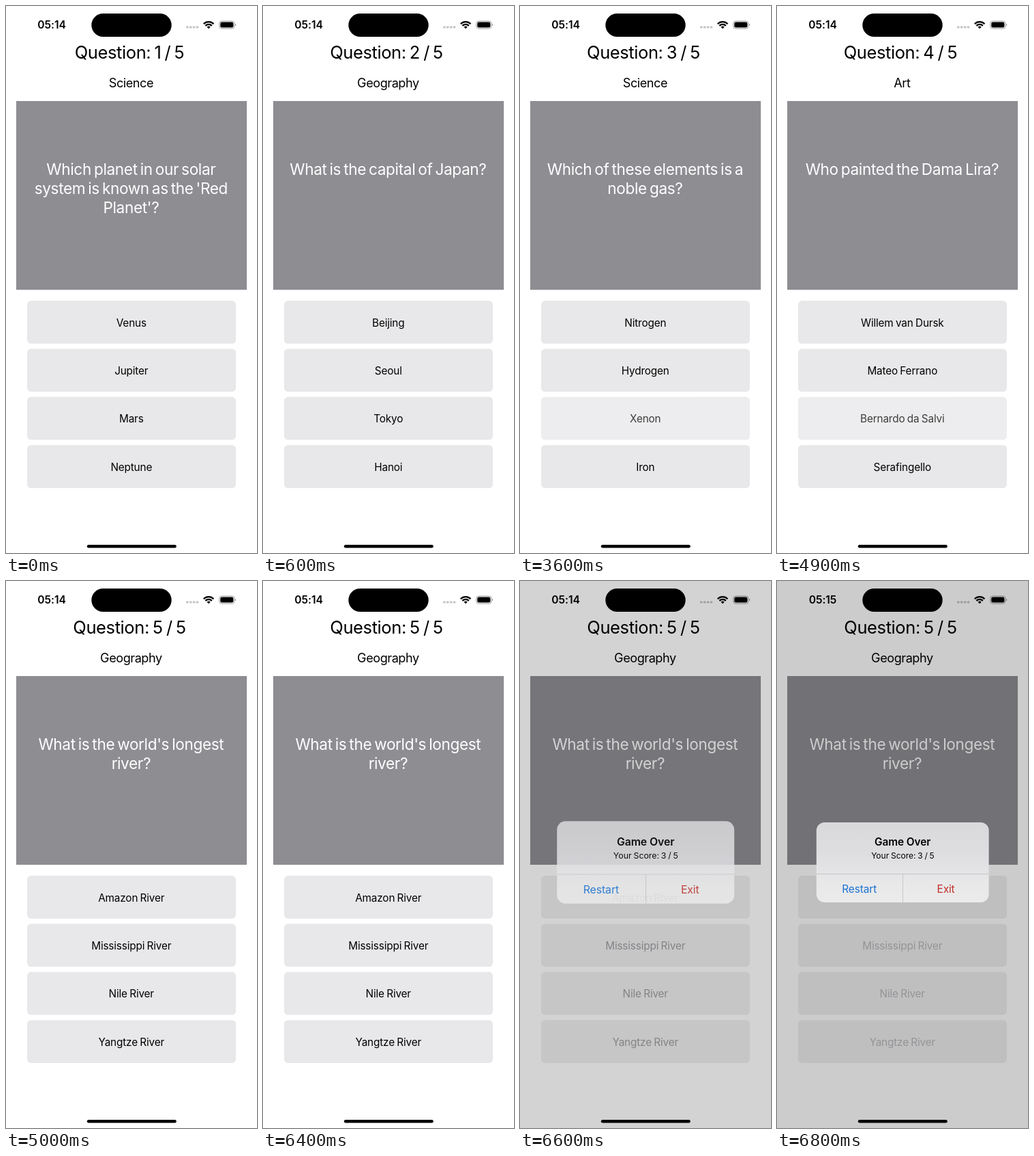
These frames come from a looping animation (368 px wide and 800 px high, 8000 ms). An HTML page:

```html
<!DOCTYPE html>
<html lang="en">
<head>
<meta charset="utf-8">
<title>Quiz</title>
<style>
html, body { margin: 0; width: 100%; height: 100%; overflow: hidden; background: #fff; }
svg { display: block; width: 100vw; height: 100vh; }
text { font-family: Inter, "Noto Sans", sans-serif; text-anchor: middle; white-space: pre; }
.head { font-size: 25.5px; letter-spacing: -.4px; word-spacing: -1.6px; }
.topic { font-size: 18.1px; letter-spacing: -.45px; }
.ask { font-size: 22.6px; letter-spacing: -.36px; word-spacing: -2px; fill: #fff; }
.pick { font-size: 15.3px; letter-spacing: -.15px; word-spacing: -.8px; }
.clock { font-size: 15.6px; font-weight: 600; letter-spacing: -.05px; }
.title { font-size: 15.4px; font-weight: 600; letter-spacing: -.08px; }
.score { font-size: 12px; word-spacing: -.6px; }
.act { font-size: 15.4px; letter-spacing: -.1px; }
</style>
</head>
<body>
<svg id="stage" viewBox="0 0 368 800">
  <defs>
    <linearGradient id="glass" x1="0" y1="0" x2="0" y2="1">
      <stop offset="0" stop-color="#d9d9dc"/>
      <stop offset=".4" stop-color="#dedee1"/>
      <stop offset=".75" stop-color="#e8e8e9"/>
      <stop offset="1" stop-color="#ebebeb"/>
    </linearGradient>
  </defs>
  <rect width="368" height="800" fill="#fff"/>
  <text id="clock" class="clock" x="67" y="33.2"></text>
  <rect x="125.3" y="11" width="117.4" height="34" rx="17"/>
  <g fill="#c3c3c5">
    <rect x="264" y="29.4" width="3.6" height="3.2" rx="1"/>
    <rect x="268.9" y="29.4" width="3.6" height="3.2" rx="1"/>
    <rect x="273.8" y="29.4" width="3.6" height="3.2" rx="1"/>
    <rect x="278.7" y="29.4" width="3.6" height="3.2" rx="1"/>
  </g>
  <g fill="none" stroke="#000" stroke-width="2.3">
    <path d="M289.8 26.2a10.3 10.3 0 0 1 14.6 0"/>
    <path d="M292.4 28.9a6.6 6.6 0 0 1 9.4 0"/>
    <path d="M294.6 30.7a3.6 3.6 0 0 1 5 0L297.1 33.3z" fill="#000" stroke="none"/>
  </g>
  <rect x="312.7" y="22.1" width="22.2" height="11" rx="3.6" fill="none" stroke="#8f8f8f" stroke-width=".9"/>
  <rect x="314.2" y="23.6" width="19.2" height="8" rx="2.3"/>
  <path d="M336.1 25.8a2 2 0 0 1 0 3.6z" fill="#8f8f8f"/>
  <text id="head" class="head" x="181" y="77"></text>
  <text id="topic" class="topic" x="183.4" y="118.9"></text>
  <rect x="15" y="139" width="338" height="276" fill="#8e8d92"/>
  <g id="ask"></g>
  <g id="picks"></g>
  <rect x="118.8" y="788" width="131" height="4.6" rx="2.3"/>
  <rect id="dim" width="368" height="800"/>
  <g id="alert">
    <rect x="57.8" y="353" width="252.8" height="117" rx="12" fill="url(#glass)"/>
    <path d="M57.8 428.5H310.6M184.5 428.5V470" stroke="#c3c3c5" stroke-width=".9"/>
    <text class="title" x="184.2" y="387.3">Game Over</text>
    <text class="score" x="184.4" y="406.2">Your Score: 3 / 5</text>
    <text class="act" x="120.7" y="455.6" fill="#1a73d3">Restart</text>
    <text class="act" x="247.5" y="455.6" fill="#bf3029">Exit</text>
  </g>
</svg>
<script>
const LOOP = 8000, STEP = 100, PRESS = 100;
const ALERT_AT = 6446, SPRING = 22.4;

// end: when the question gives way to the next; hit: the answer pressed just before
const quiz = [
  { end: 600, hit: 2, topic: "Science",
    ask: ["Which planet in our solar", "system is known as the 'Red", "Planet'?"],
    picks: ["Venus", "Jupiter", "Mars", "Neptune"] },
  { end: 2100, hit: 2, topic: "Geography",
    ask: ["What is the capital of Japan?"],
    picks: ["Beijing", "Seoul", "Tokyo", "Hanoi"] },
  { end: 3700, hit: 2, topic: "Science",
    ask: ["Which of these elements is a", "noble gas?"],
    picks: ["Nitrogen", "Hydrogen", "Xenon", "Iron"] },
  { end: 5000, hit: 2, topic: "Art",
    ask: ["Who painted the Dama Lira?"],
    picks: ["Willem van Dursk", "Mateo Ferrano", "Bernardo da Salvi", "Serafingello"] },
  { end: LOOP, hit: -1, topic: "Geography",
    ask: ["What is the world's longest", "river?"],
    picks: ["Amazon River", "Mississippi River", "Nile River", "Yangtze River"] }
];

const $ = id => document.getElementById(id);

function add(parent, tag, attrs) {
  const el = document.createElementNS("http://www.w3.org/2000/svg", tag);
  for (const k in attrs) el.setAttribute(k, attrs[k]);
  return parent.appendChild(el);
}

const lines = [0, 1, 2].map(i => add($("ask"), "text", { class: "ask", x: 183.4, y: 247.2 + i * 28 }));
const picks = [0, 1, 2, 3].map(i => {
  const y = 431 + i * 70.4, g = add($("picks"), "g", {});
  return {
    g,
    box: add(g, "rect", { x: 31, y, width: 306, height: 62.8, rx: 5.6 }),
    label: add(g, "text", { class: "pick", x: 183.8, y: y + 37.6 })
  };
});

const mix = (a, b, p) => "rgb(" + a.map((v, i) => Math.round(v + (b[i] - v) * p)) + ")";

function spring(ms) {
  if (ms <= 0) return 0;
  const u = SPRING * ms / 1000;
  return 1 - (1 + u) * Math.exp(-u);
}

function draw(ms) {
  const t = Math.floor(ms / STEP) * STEP;
  const n = quiz.findIndex(q => t < q.end), q = quiz[n];
  const pressed = t >= q.end - PRESS ? q.hit : -1;
  const p = t >= 6800 ? 1 : spring(t - ALERT_AT);

  $("clock").textContent = t < 6800 ? "05:14" : "05:15";
  $("head").textContent = `Question: ${n + 1} / ${quiz.length}`;
  $("topic").textContent = q.topic;
  lines.forEach((l, i) => l.textContent = q.ask[i] || "");
  picks.forEach((b, i) => {
    b.label.textContent = q.picks[i];
    b.g.setAttribute("opacity", i === pressed ? .76 : 1);
    // the tint drops at once, the label fades
    b.box.setAttribute("fill", p > 0 ? "#efeff0" : "#e8e8ea");
    b.label.setAttribute("fill", mix([0, 0, 0], [184, 184, 187], p));
  });

  $("dim").setAttribute("opacity", .2 * p);
  $("alert").setAttribute("opacity", p);
  $("alert").setAttribute("transform",
    `translate(184.2 411.6) scale(${1.2 - .2 * p}) translate(-184.2 -411.6)`);
}

function tick() {
  draw(performance.now() % LOOP);
  requestAnimationFrame(tick);
}
tick();
</script>
</body>
</html>
```
